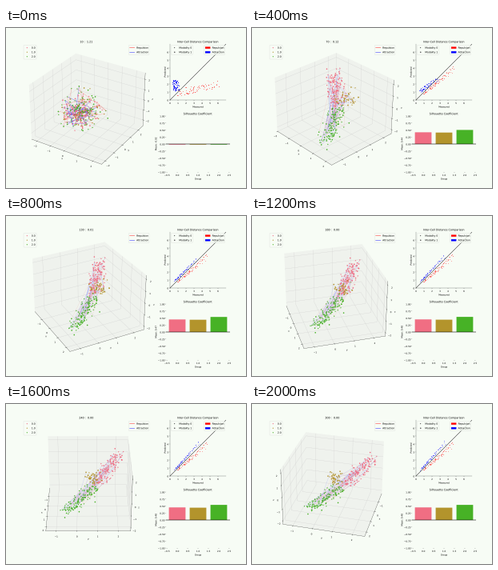
These frames come from a looping animation (300x200 px, 2200 ms). A matplotlib script:

```python
import matplotlib.pyplot as plt
import numpy as np
from matplotlib.animation import FuncAnimation
from matplotlib.lines import Line2D
from matplotlib.patches import Patch
from matplotlib.patheffects import Normal
from mpl_toolkits.mplot3d.art3d import Line3DCollection

W, H, FRAMES = 300, 200, 11
BG, PANE = "#f7fcf5", "#eff2ed"
PALETTE = ["#f06e83", "#b3942c", "#47b226"]
plt.rcParams.update({
    "font.family": "DejaVu Sans", "font.size": 10, "legend.fontsize": 11,
    "axes.labelpad": 2, "grid.color": "#c8c8c8",
    "path.snap": False, "path.effects": [Normal()],
    "figure.facecolor": BG, "axes.facecolor": BG,
})

# Cells start as one ball and settle on a strand per group; units of the view box
HALF = np.array([0.595, 0.595, 0.446])
BALL = np.array([-0.08, -0.05, -0.08])
HEADS = np.array([[-0.50, 0.48, 0.22], [0.16, 0.03, 0.18], [0.00, 0.10, -0.09]])
TAILS = np.array([[-0.10, 0.16, -0.08], [0.24, 0.09, 0.20], [0.20, -0.33, -0.37]])
SIZES = [120, 45, 135]
PAIRS, LINKS = 70, 40
SCORES = np.array([0.45, 0.44, 0.54])

rng = np.random.default_rng(7)
group = np.repeat([0, 1, 2], SIZES)
along = rng.uniform(0, 1, (len(group), 1))
strand = HEADS[group] * (1 - along) + TAILS[group] * along
jitter = np.clip(rng.normal(size=strand.shape), -2.4, 2.4)
modality = rng.integers(0, 2, len(group))
links = {c: rng.integers(0, len(group), (LINKS, 2)) for c in ("red", "blue")}
spread = {c: rng.beta(1.3, 1.8, PAIRS) for c in ("red", "blue")}
noise = {c: rng.uniform(0, 1, (2, PAIRS)) for c in ("red", "blue")}


def settle(i, rate):
    return 1 - np.exp(-rate * i)


def mix(a, b, w):
    return (1 - w) * np.asarray(a) + w * np.asarray(b)


def box(x, y, w, h):
    """Stage pixels, measured from the top left, to figure fractions."""
    return [x / W, 1 - (y + h) / H, w / W, h / H]


def dot(color, marker="o"):
    return Line2D([], [], ls="", marker=marker, ms=4.5, mew=0, color=color)


def two_legends(ax, dots, names, forces):
    ax.add_artist(ax.legend(dots, names, loc="upper left"))
    ax.legend(forces, ["Repulsion", "Attraction"], loc="upper right")


def draw_space(fig, i):
    epoch = 10 + 10 * round(2.9 * i)
    loss = [1.21, 2.06][i] if i < 2 else 0.12 * 0.29 ** (i - 2)
    low = mix([-2.4, -2.4, -2.6], [-1.9, -1.5, -2.3], settle(i, 0.7))
    high = mix([2.6, 2.6, 2.6], [2.4, 2.6, 2.3], settle(i, 0.7))

    ax = fig.add_axes(box(20.5, 20, 160, 160), projection="3d")
    ax.view_init(30, -60.2 + epoch / 4)
    ax.set(xlim=(low[0], high[0]), ylim=(low[1], high[1]),
           zlim=(low[2], high[2]), xlabel="x", ylabel="y", zlabel="z")
    for axis in (ax.xaxis, ax.yaxis, ax.zaxis):
        axis.set_major_locator(plt.MultipleLocator(1))
        axis.set_pane_color(PANE)

    cells = mix(BALL, strand, settle(i, 2))
    cells = cells + jitter * (0.05 + 0.08 * np.exp(-0.9 * i))
    cells = (low + high) / 2 + (high - low) / 2 * cells / HALF
    for color, base, extra in (("red", 0.12, 0.3), ("blue", 0.2, 0.5)):
        ax.add_collection3d(Line3DCollection(
            cells[links[color]], colors=color, lw=1.1,
            alpha=base + extra * np.exp(-i)))
    for m, marker in enumerate(">o"):
        pick = modality == m
        ax.scatter(*cells[pick].T, s=34, marker=marker, lw=0, depthshade=False,
                   c=[PALETTE[g] for g in group[pick]])

    ax.set_title(f"{epoch} :  {loss:.2f}")
    two_legends(ax, [dot(c) for c in PALETTE], ["0.0", "1.0", "2.0"],
                [Line2D([], [], color=c) for c in ("red", "blue")])


def distances(i, color):
    s, (n, k) = spread[color], noise[color]
    if color == "red":
        w = settle(i, 1.5)
        x = 0.9 + s * mix(5.6, 4, w)
        return x, mix(0.3 + 0.9 * n + 0.2 * x, x * (0.76 + 0.2 * k), w)
    w = settle(i, 0.5)
    x = mix(0.3 + 0.9 * s, 0.4 + 3.6 * s, w)
    return x, mix(1.2 + 1.3 * n, x * (1.03 + 0.17 * k) + 0.2, w)


def draw_comparison(fig, i):
    ax = fig.add_axes(box(205, 20, 70, 70))
    ax.plot([0, 7], [0, 7], color="black", lw=1.5)
    for color, fade in (("red", 0.1), ("blue", 0.5)):
        x, y = distances(i, color)
        for m, marker in enumerate(">o"):
            ax.scatter(x[m::2], y[m::2], s=11, marker=marker, lw=0,
                       color=color, alpha=0.4 + fade * np.exp(-0.7 * i))
    ax.set(xlim=(0, 7), ylim=(0, 7), xticks=range(7), yticks=range(7),
           xlabel="Measured", ylabel="Predicted")
    ax.set_title("Inter-Cell Distance Comparison")
    ax.spines[["top", "right"]].set_visible(False)
    two_legends(ax, [dot("black", ">"), dot("black")],
                ["Modality 0", "Modality 1"],
                [Patch(color=c) for c in ("red", "blue")])


def draw_silhouette(fig, i):
    ax = fig.add_axes(box(200, 110, 80, 70))
    scores = mix(-0.02, SCORES, settle(i, 1.35))
    ax.bar(range(3), scores, color=PALETTE)
    ax.axhline(0, color="black", lw=2)
    ax.set(xlim=(-0.54, 2.54), ylim=(-1, 1), xlabel="Group",
           ylabel=f"Mean: {scores.mean():.2f}")
    ax.set_yticks(np.linspace(-1, 1, 9))
    ax.set_title("Silhouette Coefficient")
    ax.spines[:].set_visible(False)


def draw(i):
    fig.clear()
    draw_space(fig, i)
    draw_comparison(fig, i)
    draw_silhouette(fig, i)
    return []


fig = plt.figure(figsize=(15, 10), dpi=20)
anim = FuncAnimation(fig, draw, frames=FRAMES, interval=200, repeat=True,
                     repeat_delay=0, cache_frame_data=False)
plt.show()
```
